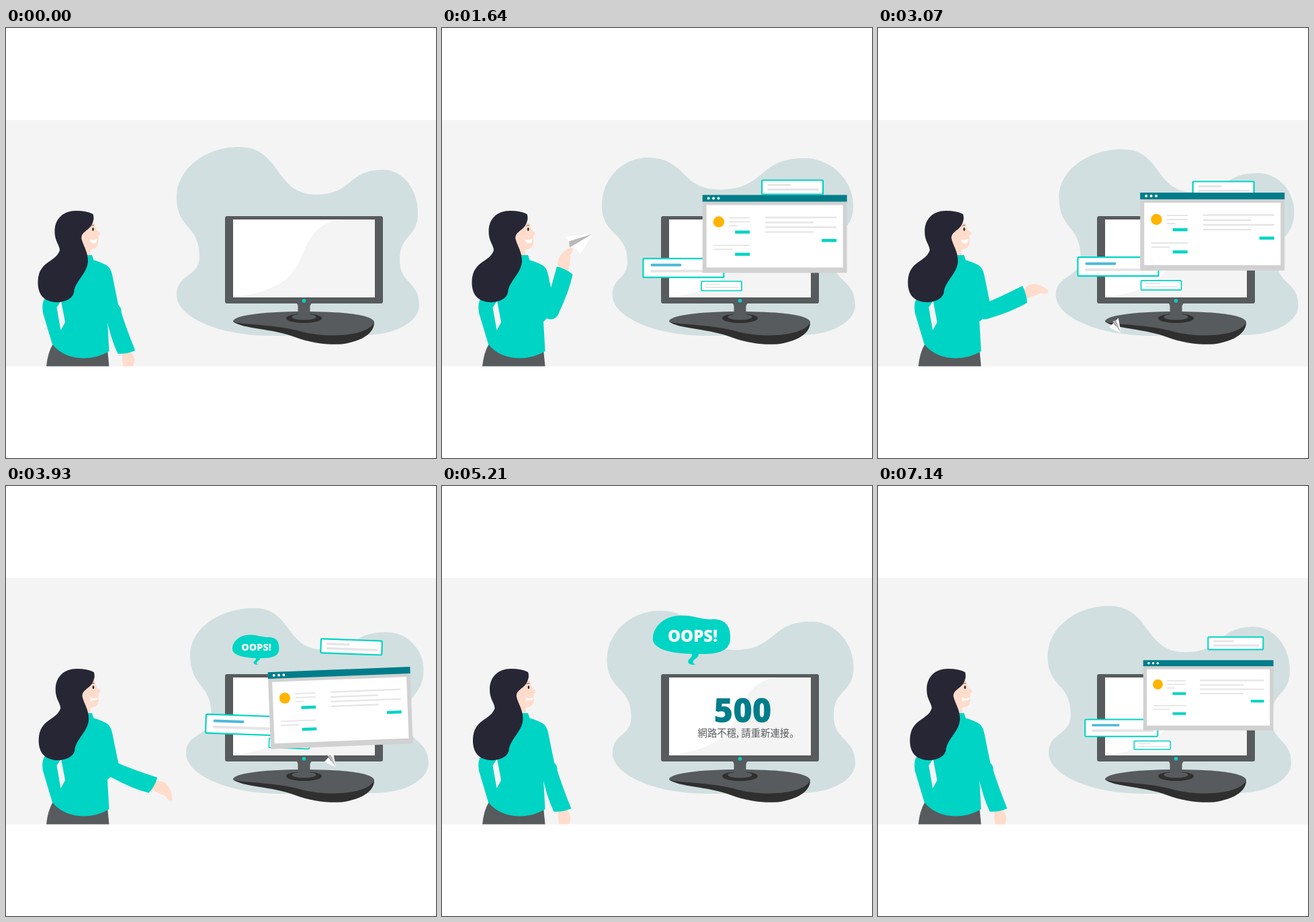
Recreate the animation shown at these times as an HTML page. Size 640x640 px, loop 7210 ms.

```html
<!DOCTYPE html>
<html lang="zh">
<head>
<meta charset="utf-8">
<title>500</title>
<style>
  html, body { margin: 0; width: 100%; height: 100%; overflow: hidden; background: #fff; }
  svg { display: block; width: 100vw; height: 100vh; }
  .teal { fill: #00d4c4; }
  .steel { fill: #575b5e; }
  .dark { fill: #2f2f30; }
  .skin { fill: #ffdccb; }
  .hair { fill: #272635; }
  .line { fill: none; stroke: #e5e5e5; stroke-width: 2.3; }
  .thick { stroke-width: 3.4; }
  .card { fill: #fff; stroke: #00d4c4; stroke-width: 2.2; }
  .latin { font-family: "Open Sans", "Noto Sans", sans-serif; font-weight: 800; text-anchor: middle; }
  .cjk { font-family: "Noto Sans CJK JP", "Noto Sans CJK", sans-serif; font-size: 14.4px; }
</style>
</head>
<body>
<svg viewBox="0 0 640 640">
  <clipPath id="band"><rect y="137" width="640" height="366.5"/></clipPath>
  <g clip-path="url(#band)">
    <rect y="137" width="640" height="367" fill="#f4f4f4"/>
    <path id="blob" fill="#d1dfe0"/>

    <g id="monitor">
      <path class="dark" d="M338 437C352 448 396 447 430 460C455 469 478 472 500 470.500C532 466 549 453 548 437Z"/>
      <path class="steel" d="M338 437C337 429 375 422 443 422C510 422 550 428 548 439C536 459 480 462 440 452C405 441 350 442 338 437Z"/>
      <ellipse class="dark" cx="443.5" cy="432" rx="26.5" ry="7"/>
      <ellipse class="steel" cx="443.5" cy="430" rx="18" ry="4.5"/>
      <path class="steel" d="M431 409H457Q452 410 452.500 417V431H434.500V417Q435 410 431 409Z"/>
      <rect class="steel" x="326" y="280" width="235" height="130" rx="3"/>
      <rect x="338" y="285" width="211" height="116" fill="#fff"/>
      <path fill="#f4f4f4" d="M338 401C395 393 425 378 440 340C452 307 470 286 503 285H549V401Z"/>
      <circle class="teal" cx="443.500" cy="406" r="2.800"/>
    </g>

    <g id="message">
      <text class="latin" x="447.500" y="352" font-size="49" fill="#007d8a">500</text>
      <text class="cjk steel" lang="ja" x="380.500" y="373">網路不穩, 請重新連接。</text>
    </g>

    <g id="tag">
      <rect class="card" x="-45.500" y="-10.500" width="91" height="21" rx="1.500"/>
      <path class="line thick" d="M-37-3.400H-3M-37 3.400H39"/>
    </g>
    <g id="search">
      <rect class="card" x="-60" y="-14" width="120" height="28" rx="1.500"/>
      <path class="line" style="stroke-width:4" d="M-49 4.500H53"/>
      <path d="M-47-4.500H-5" stroke="#4dbad8" stroke-width="4" stroke-linecap="round"/>
    </g>
    <g id="note">
      <rect class="card" x="-30" y="-7" width="60" height="14" rx="1" style="stroke-width:1.700"/>
      <path class="line" style="stroke-width:1.700" d="M-24-2.500H-2M-24 2.200H25"/>
    </g>
    <g id="page">
      <rect x="-107.500" y="-58" width="215" height="116" fill="#d1d1d1"/>
      <rect x="-107.500" y="-58" width="215" height="10" fill="#007d8a"/>
      <rect x="-101.500" y="-43" width="203" height="93" fill="#fff"/>
      <path d="M-98.500-53h.01m7.400 0h.01m7.400 0h.01" stroke="#fff" stroke-width="4" stroke-linecap="round"/>
      <circle cx="-83.300" cy="-18" r="8.300" fill="#ffb400"/>
      <path class="line" style="stroke-width:1.800" d="M-68-24H-37M-68-18H-37M-68-12H-55M-91 17H-37M-91 23H-63"/>
      <path class="line" d="M-14-24.500H92M-14-17H58M-14-10H92M-14-2.800H58"/>
      <path class="teal" d="M-59-5H-37V-.500H-59ZM-59 28H-37V32.500H-59ZM70 7.500H92V12H70Z"/>
    </g>

    <g id="bubble">
      <path class="teal" d="M352 193C372 191 381 198 400 198.500C422 197 430 209 429 228C428 245 412 251 382 250C382 257 374 257 373.500 262Q374 265 378 265.500C370 267 365 264 366.500 260C368 256 373 255 372 250C345 249 318 245 314 230C312 211 330 194 352 193Z"/>
      <text class="latin" x="373" y="232" font-size="24" fill="#fff">OOPS!</text>
    </g>

    <g id="person">
      <path class="steel" d="M70 470Q62 483 60 504H153.500L151 478Z"/>
      <g id="face">
        <path class="skin" d="M110 298L131 289Q133 296 135 301Q141 304 140 306.500Q139 308.500 137 309L137.500 318Q137 327 131 328.500Q126 329.500 125 331L126 343H112Z"/>
        <ellipse cx="129.500" cy="299.500" rx="1.300" ry="2.600" fill="#222"/>
        <path d="M126.500 295Q128.500 292.500 131 293.700" fill="none" stroke="#443a40" stroke-width=".8"/>
        <path id="smile" fill="#fff" d="M124.500 314.500Q130 316.500 135.500 314Q136 320.500 130.500 320.500Q126 320 124.500 314.500Z"/>
        <path id="grimace" fill="#fff" d="M125.500 314.500L129 316.500L137 315L135.500 318L128.500 319L125 321Z"/>
      </g>
      <path class="teal" d="M110 338H128L130.500 345.500Q143 349 151 354Q156 358 158 367L169 421L151 437L153.500 481Q138 491 115 491.500Q86 491 69 471L55 424Q52.500 409 58 402L85 390Z"/>
      <path fill="#f4f4f4" d="M82 406L88 438L81.500 450L75.500 416Z"/>
      <g id="forearm">
        <path id="hand" class="skin" d="M60-5C70-7 74-11 81-8C89-5 97 4 98 12C94 15 90 11 86 9C79 10 72 8 60 7Z"/>
        <circle class="teal" r="12"/>
        <path class="teal" d="M0-11Q30-10 66-12Q67 3 62 14Q36 17 0 12Z"/>
      </g>
      <path id="hair" class="hair" d="M104 272Q120 272 129.500 277Q132 283 128.500 291C124 302 111 303 112.500 314C115 324 122 333 122 347C121 366 102 377 101 394C98 405 84 409 72 408C54 406 47 394 47.500 377C49 346 73 350 80 331C80 323 72 317 72.500 302C73 283 86 272 104 272Z"/>
    </g>

    <g id="plane">
      <path fill="#fff" d="M-20-9L21-13L-14-2Z"/>
      <path fill="#b9b9b9" d="M-14-2L21-13L-13 7Z"/>
      <path fill="#fff" d="M-8 5L21-13L3 17Z"/>
    </g>
  </g>
</svg>
<script>
const LOOP = 7210;
const { PI, sin, cos, abs, min, max } = Math;
const el = Object.fromEntries([...document.querySelectorAll('[id]')].map(node => [node.id, node]));

const clamp = v => min(1, max(0, v));
const mix = (a, b, p) => a + (b - a) * p;
const ramp = (t, from, to) => clamp((t - from) / (to - from));
const easeOut = p => 1 - (1 - p) ** 3;
// Eased 0 to 1 between two times.
const step = (t, from, to) => {
  const p = ramp(t, from, to);
  return p * p * (3 - 2 * p);
};
const place = (node, x, y, angle = 0, scale = 1) =>
  node.setAttribute('transform', `translate(${x} ${y}) rotate(${angle}) scale(${scale})`);
const show = (node, on) => node.setAttribute('visibility', on ? 'visible' : 'hidden');

// Turning points of the blob at rest, each with a vertical or horizontal tangent.
const outline = 'v254,252 h347,177 h462,248 h562,211 v613,275 v586,345 v615,413 h535,457 h395,458 v254,397 v288,340'
  .split(' ').map(s => ({ dir: s[0], at: s.slice(1).split(',').map(Number) }));

// The upper part sways sideways while a wave runs across it; the foot stays put.
function swayed([x, y], lean) {
  const height = clamp((400 - y) / 130);
  const u = (x - 200) / 415;
  const wave = height * sin(2 * PI * (x - 200) / 460);
  if (lean < 0) {
    const pull = 90 * height * sin(PI * u) * (.65 + .45 * u);
    return [x + lean * pull, y - lean * 28 * wave];
  }
  const ripple = 10 * height * cos(4 * PI * (x - 200) / 460);
  return [x + lean * (19 + 13 * wave), y - lean * ripple];
}
function drawBlob(t) {
  const beat = t / LOOP * 3;
  const lean = 2 * abs(beat - Math.floor(beat + .5)) * (Math.floor(beat) === 1 ? 1 : -1);
  const pts = outline.map(({ dir, at }) => ({ dir, at: swayed(at, lean) }));
  const handle = (a, b) => a.dir === 'h'
    ? [mix(a.at[0], b.at[0], .55), a.at[1]] : [a.at[0], mix(a.at[1], b.at[1], .55)];
  el.blob.setAttribute('d', `M${pts[0].at}` + pts.map((a, i) => {
    const b = pts[(i + 1) % pts.length];
    return `C${handle(a, b)} ${handle(b, a)} ${b.at}`;
  }).join('') + 'Z');
}

// Place, drift, tilt before falling, and time of the drop.
const panels = [
  { id: 'tag', x: 521.6, y: 237, dx: -7.5, dy: 2, tilt: 2, drop: 3900 },
  { id: 'search', x: 359.4, y: 357.2, dx: -2, dy: -2, tilt: 2, drop: 3900 },
  { id: 'note', x: 416, y: 384, dx: 5.5, dy: -1.2, tilt: 2, drop: 3900 },
  { id: 'page', x: 495.2, y: 306.5, dx: 2.5, dy: -3.5, tilt: -2.2, drop: 3700 }
];
function drawPanels(t) {
  const again = t > 6000;
  const grown = easeOut(again ? ramp(t, 6560, 7640) : ramp(t, 200, 1280));
  const drift = min(1, ((again ? t - 7540 : t) - 1640) / 1430);
  for (const { id, x, y, dx, dy, tilt, drop } of panels) {
    const fall = again ? 0 : max(0, t - drop) / 1000;
    const turn = again ? 0 : tilt * max(0, t - 3700) / 230;
    place(el[id], x + dx * drift, y + dy * drift + 510 * fall ** 2, turn, grown * (1 - .28 * fall ** 2));
    show(el[id], grown > 0 && (again || t < 4800));
  }
}

function drawPerson(t) {
  const sway = -3 * step(t, 0, 700) + 4.2 * step(t, 3100, 3930) - 2.7 * step(t, 4300, 5200) + 1.5 * step(t, 5500, 6280);
  place(el.hair, sway, 0);
  place(el.face, sway * .4, 0);
  show(el.smile, t < 3650);
  show(el.grimace, t >= 3650);

  const raise = step(t, 350, 1050), toss = step(t, 2050, 2450);
  const drop = step(t, 3150, 3930), rest = step(t, 3950, 4850);
  const arm = 71 - 143 * raise + 48 * toss + 45 * drop + 50 * rest;
  const wrist = 9 - 26 * raise + 17 * toss + 9 * rest;
  const elbow = [159.5 + 2.5 * (raise - toss), 421.5];
  place(el.forearm, ...elbow, arm);
  el.hand.setAttribute('transform', `rotate(${wrist} 62 1)`);
  return { arm, elbow };
}

function drawPlane(t, { arm, elbow }) {
  show(el.plane, t > 350 && t < 4500);
  const turn = arm + 72;
  if (t < 2250) {
    const a = turn * PI / 180, reach = 41, lift = 102;
    place(el.plane, elbow[0] + reach * cos(a) + lift * sin(a),
      elbow[1] + reach * sin(a) - lift * cos(a), turn);
    return;
  }
  const p = ramp(t, 2250, 3930), swoop = sin(3 * PI * p);
  const fall = max(0, t - 3930) / 1000;
  place(el.plane, mix(230, 483, p), mix(331, 408, p) - 75 * swoop + 510 * fall ** 2,
    mix(20, 84, p) - 34 * swoop, mix(1, .55, min(1, 2 * p)));
}

function drawBubble(t) {
  const size = easeOut(ramp(t, 3780, 4350)) - step(t, 5850, 6450);
  el.bubble.setAttribute('transform', `translate(372 265.5) scale(${size}) translate(-372 -265.5)`);
  show(el.bubble, size > 0);
  el.message.setAttribute('opacity', step(t, 4400, 4750) - step(t, 5800, 6150));
}

const start = performance.now();
function render() {
  const t = (performance.now() - start) % LOOP;
  drawBlob(t);
  drawPanels(t);
  drawPlane(t, drawPerson(t));
  drawBubble(t);
  requestAnimationFrame(render);
}
render();
</script>
</body>
</html>
```
